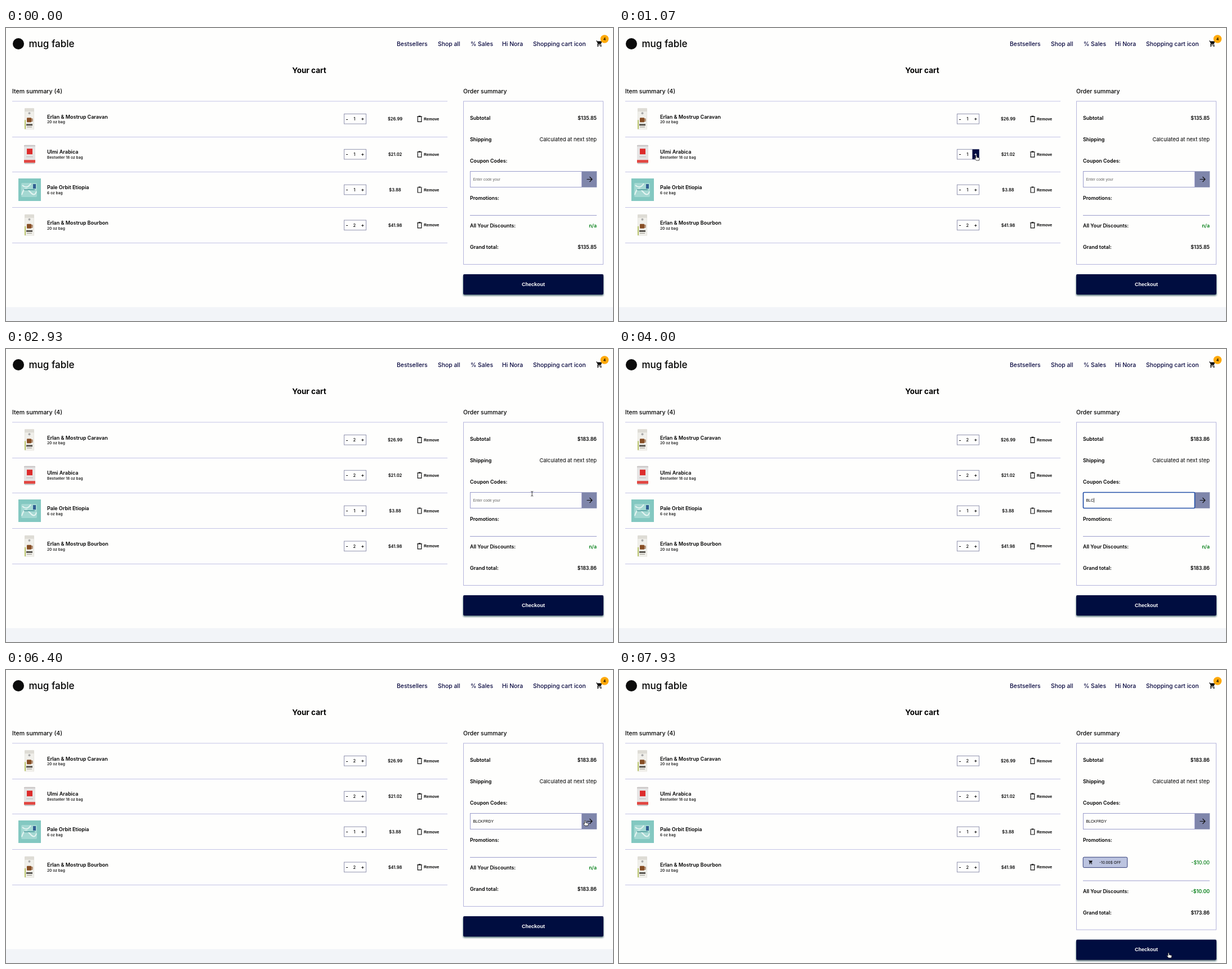
Animation of 1078 by 520 pixels, one loop 8 s. Source, as an HTML page:

```html
<!DOCTYPE html>
<html lang="en">
<head>
<meta charset="utf-8">
<title>Cart</title>
<style>
html, body { margin: 0; width: 100%; height: 100%; overflow: hidden; background: #fefefd; }
svg { display: block; font-family: Inter, "Open Sans", sans-serif; }
.ui { font-family: "Liberation Sans", Arial, sans-serif; }
</style>
</head>
<body>
<svg id="stage" width="1078" height="520"></svg>
<script>
const LOOP = 8000, CODE = 'BLCKFRDY', NAVY = '#020b3f';
const TYPE_START = 3530, TYPE_STEP = 215, FOCUS = [3200, 6330], PROMO_AT = 6700, SHIFT = 41.5;
const CLICKS = { 0: 2000, 1: 1350 };
const PATH = [
  [300, 660, 522], [950, 634.5, 226], [1450, 634.5, 226], [1750, 629.5, 163.5], [2450, 629.5, 163.5],
  [3050, 969, 267.5], [5480, 969, 267.5], [6050, 1028.5, 267.5], [6800, 1028.5, 267.5], [7500, 976, 502]
];
const rowY = i => 161.3 + 62.85 * i;

// y is the middle of the capitals
const text = (x, y, str, size, weight = 600, attrs = '') =>
  `<text x="${x}" y="${y + size * .36}" font-size="${size}" font-weight="${weight}" ${attrs}>${str}</text>`;
const rect = (x, y, w, h, fill, attrs = '') =>
  `<rect x="${x}" y="${y}" width="${w}" height="${h}" fill="${fill}" ${attrs}/>`;
const line = (x1, x2, y, color) => `<path d="M${x1} ${y}H${x2}" stroke="${color}"/>`;
const END = 'text-anchor="end"', MID = 'text-anchor="middle"';

const cartIcon = (x, y, scale) => `<g transform="translate(${x} ${y}) scale(${scale})">
  <path d="M1 2h3l1 2h16l-4 9H8l-1 2h12v2H5l-.5-2 2-3L3 4H1z"/>
  <circle cx="7" cy="20" r="2"/><circle cx="17" cy="20" r="2"/></g>`;

const bag = y => rect(33, y - 19, 17, 38, '#dedcd5', 'rx="1"') + rect(33.5, y - 13, 16, 32, '#f0efea') +
  rect(33, y + 2, 2, 16, '#b6c267') + `<circle cx="41.5" cy="${y - 10}" r="2" fill="#aaa"/>` +
  rect(37, y - 2, 8, 8, '#874e25', 'rx="1"') + rect(45, y, 2, 4, 'none', 'stroke="#874e25"') +
  rect(36, y + 9, 11, 3, '#55524c') + rect(37, y + 14, 9, 1, '#99958c');
const tin = y => rect(32, y - 17, 20, 34, '#e6e4e4', 'rx="2"') + rect(32, y - 16, 20, 2, '#c9c5c5') +
  rect(37, y - 10, 10, 10, '#dd2c2c') + rect(36, y + 4, 12, 1, '#bbb') +
  rect(32, y + 10, 20, 5, '#e24742') + rect(33, y + 15, 18, 2, '#c4c0c0');
const box = y => rect(22, y - 20, 40, 40, '#83c8c1') + rect(27, y - 12, 28, 25, '#a4d8d2', 'rx="2"') +
  `<path d="M28 ${y + 9}q5-17 14-6t12 0" fill="none" stroke="#e4f4f1" stroke-width="2"/>` +
  `<path d="M29 ${y - 8}q8 8 15-3" fill="none" stroke="#e4f4f1" stroke-width="2"/>` +
  rect(48, y - 10, 5, 8, '#315f92') + rect(32, y - 1, 19, 2, '#5fa7a7');

const items = [
  ['Erlan &amp; Mostrup Caravan', '20 oz bag', 26.99, 1, bag],
  ['Ulmi Arabica', 'Bestseller 18 oz bag', 21.02, 1, tin],
  ['Pale Orbit Etiopia', '6 oz bag', 3.88, 1, box],
  ['Erlan &amp; Mostrup Bourbon', '20 oz bag', 41.98, 2, bag]
];

const itemRow = ([name, size, price, qty, picture], i) => {
  const y = rowY(i);
  return picture(y) + text(73, y - 4, name, 9) + text(73, y + 5.6, size, 6.7, 500) +
    rect(600.5, y - 8.8, 39, 17.6, 'none', 'stroke="#9294b0"') +
    rect(627.5, y - 8.8, 12, 17.6, 'none', `id="plusBox${i}"`) +
    text(605.5, y, '-', 9, 600, MID) + text(618.7, y, qty, 7.5, 500, `${MID} id="qty${i}"`) +
    text(633.3, y, '+', 8.5, 600, `${MID} id="plus${i}"`) +
    text(691, y + .3, '$' + price, 7.5, 600, MID) +
    `<path d="M730 ${y - 4}h9M732.5 ${y - 5}h4M731.2 ${y - 3}v8h6.6v-8" fill="none" stroke="#111" stroke-width="1.2"/>` +
    text(742, y, 'Remove', 7, 700, 'class="ui"') + line(11, 784, Math.round(y + 31.2) + .5, '#c3c3e6');
};

const stage = document.getElementById('stage');
stage.innerHTML = `
  <defs><filter id="shadow" x="-5%" y="-20%" width="110%" height="150%">
    <feDropShadow dx="0" dy="2" stdDeviation="1.8" flood-color="#07343f" flood-opacity=".75"/></filter></defs>
  ${rect(0, 495.5, 1078, 25, '#f2f4f8', 'id="footer"')}
  <circle cx="22" cy="28" r="10" fill="#0b0b0b"/>
  ${text(40.5, 28, 'mug fable', 17, 500)}
  <g fill="#07073f">${[[694, 'Bestsellers'], [767, 'Shop all'], [825, '% Sales'], [881, 'Hi Nora'],
    [936, 'Shopping cart icon']].map(([x, s]) => text(x, 28, s, 10.4, 500)).join('')}</g>
  ${cartIcon(1047.5, 21.5, .53)}
  <circle cx="1063" cy="19.5" r="7.3" fill="#ffa909"/>
  ${text(1063, 19.5, '4', 6.8, 600, MID)}
  ${text(538.5, 75, 'Your cart', 13.5, 700, MID)}
  ${text(11, 112, 'Item summary (4)', 10.5, 500)}
  ${text(812, 112, 'Order summary', 10.4, 500)}
  ${line(11, 784, 130, '#c3c3e6')}${items.map(itemRow).join('')}
  ${rect(812.5, 130, 248, 289.5, 'none', 'stroke="#b4b4dc" id="panel"')}
  ${text(824, 160, 'Subtotal', 9)}${text(1049, 160, '', 8.8, 600, END + ' id="subtotal"')}
  ${text(824, 197.5, 'Shipping', 9)}${text(1049, 197.5, 'Calculated at next step', 9.4, 400, END)}
  ${text(824, 235.5, 'Coupon Codes:', 8.9)}
  ${rect(1022.5, 254.5, 26.5, 28, '#7f86ab', 'stroke="#8a8fb8" stroke-width=".6"')}
  <path d="M1031.5 268.5h9M1036.5 264l4.4 4.5-4.4 4.5" fill="none" stroke="#111" stroke-width="1.2"/>
  ${rect(824.5, 254.5, 198, 28, '#fefefd', 'id="field"')}
  ${text(829.5, 268.4, '', 6.85, 400, 'class="ui" id="code"')}
  ${rect(0, 264.5, .8, 8, '#111', 'id="caret"')}
  ${text(824, 301.5, 'Promotions:', 8.9)}
  <g id="promo">
    ${rect(824.2, 332.2, 78.6, 18.4, '#bcc4e0', 'rx="2" stroke="#2f3a78"')}
    ${cartIcon(833.5, 337, .35)}${text(853, 341.3, '-10.00$ OFF', 6.6, 400)}
    ${text(1049, 341.5, '-$10.00', 8.8, 500, END + ' fill="#007d14"')}
  </g>
  <g id="lower">
    ${line(824, 1049, 332.5, '#9a9ccb')}
    ${text(824, 351, 'All Your Discounts:', 8.9)}
    ${text(1049, 351, '', 8.8, 600, END + ' fill="#007d14" id="discount"')}
    ${text(824, 389, 'Grand total:', 9)}${text(1049, 389, '', 8.8, 600, END + ' id="total"')}
    ${rect(812, 437, 249, 36, NAVY, 'rx="2" filter="url(#shadow)"')}
    ${text(936.5, 454.5, 'Checkout', 9, 700, MID + ' class="ui" fill="#fff"')}
  </g>
  <g id="cursor" stroke-width=".8">
    <path d="M0 0V9.5l2.2-2 1.5 3.4 1.5-.7L3.7 7h3z" fill="#111" stroke="#fff"/>
    <path d="M-1 .8a1 1 0 0 1 2 0V3.5l4 .8q.8.3.7 1.2L5 9H0L-3 5.4q.3-1.2 1.2-.7L-1 5.5z" fill="#fff" stroke="#111"/>
    <path d="M-2-4.2q2 0 2 1.2q0-1.2 2-1.2M0-3V3M-2 4.2q2 0 2-1.2q0 1.2 2 1.2" fill="none" stroke="#111"/>
  </g>`;

const el = id => document.getElementById(id);
const set = (id, attrs) => { for (const k in attrs) el(id).setAttribute(k, attrs[k]); };
const show = (node, on) => node.setAttribute('visibility', on ? 'visible' : 'hidden');
const money = v => '$' + v.toFixed(2);

function pointer(t) {
  const i = PATH.findIndex(p => p[0] > t);
  if (i === 0) return PATH[0].slice(1);
  if (i < 0) return PATH[PATH.length - 1].slice(1);
  const [t0, x0, y0] = PATH[i - 1], [t1, x1, y1] = PATH[i];
  const u = (t - t0) / (t1 - t0), e = u * u * (3 - 2 * u);
  return [x0 + (x1 - x0) * e, y0 + (y1 - y0) * e];
}

function draw(t) {
  const [x, y] = pointer(t);
  const inside = (l, top, r, b) => x >= l && x <= r && y >= top && y <= b;
  const promo = t >= PROMO_AT, shift = promo ? SHIFT : 0;
  let subtotal = 0, overButton = false;

  items.forEach(([, , price, qty], i) => {
    const sinceClick = t - (CLICKS[i] ?? Infinity);
    const count = qty + (sinceClick >= 0 ? 1 : 0);
    const hover = t > 300 && inside(627, rowY(i) - 9, 640, rowY(i) + 9);
    const pressed = sinceClick >= 0 && sinceClick < 250;
    overButton ||= hover;
    subtotal += price * count;
    el('qty' + i).textContent = count;
    set('plusBox' + i, { fill: hover ? (pressed ? '#5d668f' : NAVY) : 'none' });
    set('plus' + i, { fill: hover ? (pressed ? '#8f96b5' : '#fff') : '#000' });
  });
  el('subtotal').textContent = money(subtotal);
  el('total').textContent = money(subtotal - (promo ? 10 : 0));
  el('discount').textContent = promo ? '-$10.00' : 'n/a';
  show(el('promo'), promo);
  show(el('footer'), !promo);
  set('lower', { transform: `translate(0 ${shift})` });
  set('panel', { height: 289.5 + shift });

  const focused = t >= FOCUS[0] && t < FOCUS[1];
  const typed = Math.max(0, Math.min(CODE.length, Math.floor((t - TYPE_START) / TYPE_STEP) + 1));
  const lastKey = typed ? TYPE_START + (typed - 1) * TYPE_STEP : FOCUS[0];
  el('code').textContent = typed ? CODE.slice(0, typed) : 'Enter code your';
  set('code', { fill: typed ? '#000' : '#666' });
  set('field', { stroke: focused ? '#2450a8' : '#9a9ccb', 'stroke-width': focused ? 1.7 : 1, rx: focused ? 1.5 : 0 });
  set('caret', { x: 829.7 + (typed ? el('code').getComputedTextLength() : 0) });
  show(el('caret'), focused && (t - lastKey) % 1000 < 500);

  const overField = inside(824, 254, 1022, 283);
  overButton ||= inside(1022, 254, 1049, 283) || inside(812, 437 + shift, 1061, 473 + shift);
  const kind = overField ? 2 : overButton ? 1 : 0;
  const visible = t >= 300 && !(t >= TYPE_START && t < 5400);
  set('cursor', { transform: `translate(${x} ${y})` });
  [...el('cursor').children].forEach((shape, i) => show(shape, visible && i === kind));
}

const start = performance.now();
function tick() {
  draw((performance.now() - start) % LOOP);
  requestAnimationFrame(tick);
}
tick();
</script>
</body>
</html>
```
